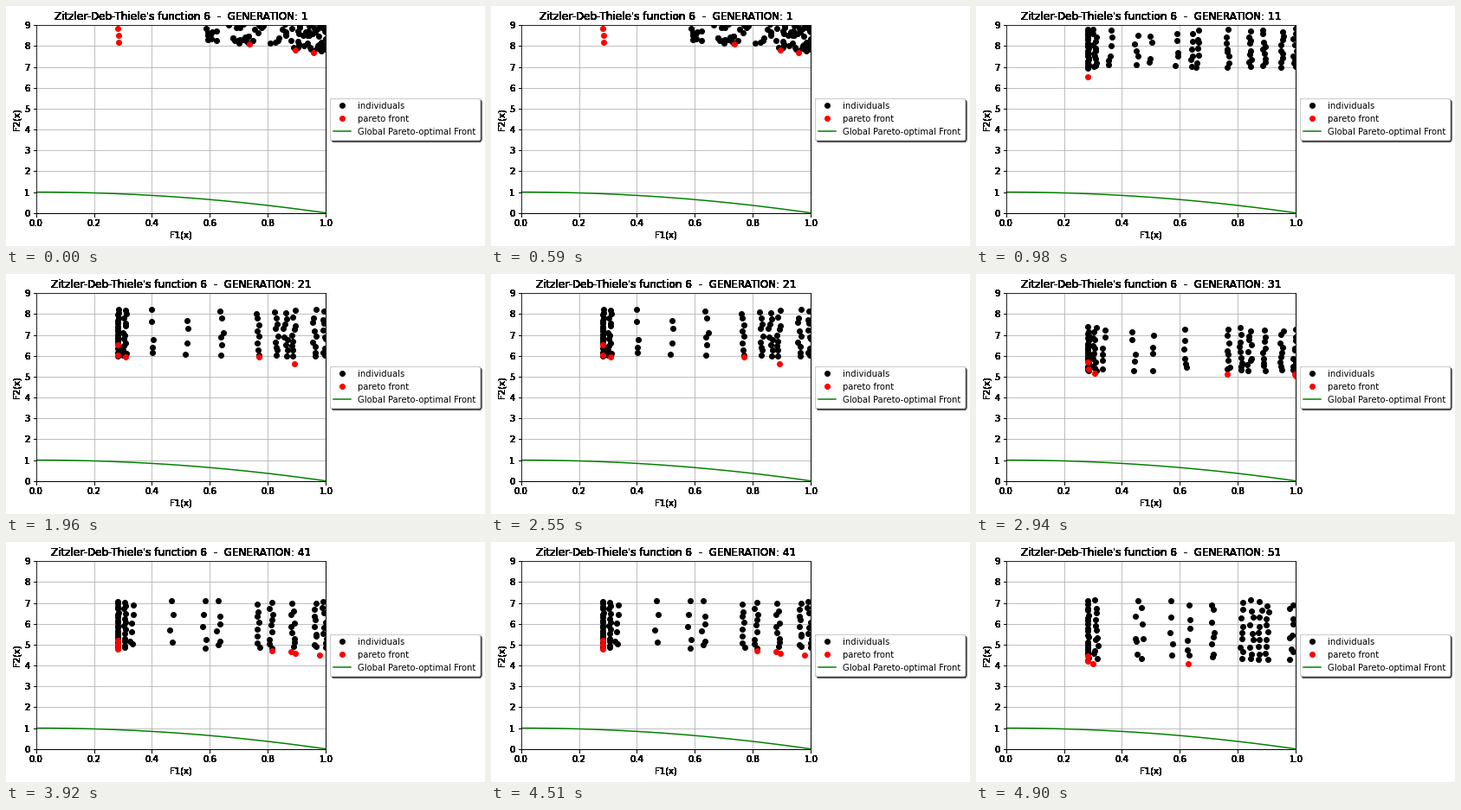
A matplotlib script for the animation above (5880 ms loop, 553 by 278 pixels).

```python
import numpy as np
import matplotlib.pyplot as plt
from matplotlib.animation import FuncAnimation

W, H, DPI = 553, 278, 72
LEFT, BOTTOM = 34.56, 38.3         # lower left corner of the plot area, px
AX_W, AX_H = 334.8, 217.44
Y_MAX = 9
LAYERS = 24                        # stacked axes make the outer text heavy
STEP_MS = 980

plt.rcParams.update({"font.family": "DejaVu Sans", "font.size": 10})


def starters(rng, n=95):
    """First random individuals, packed towards the upper right corner."""
    x = 1 - 0.42 * rng.random(n) ** 2.4
    floor = 8.1 - 0.35 * (x - 0.6) / 0.4
    return x, floor + (9.1 - floor) * rng.random(n)


def columns(rng, centres, low, high):
    """Upright groups of individuals, fullest at the first centre."""
    xs, ys = [], []
    for k, centre in enumerate(centres):
        n = round(np.interp(centre, [0.283, 0.33, 0.5, 0.8], [20, 6, 4, 9]))
        t = (np.arange(n) + rng.uniform(0.1, 0.9, n)) / n
        spread = 0.007 if k else 0.001
        xs.append(centre + rng.uniform(-spread, spread, n))
        ys.append(low + (high - low) * t ** 1.2)
    return np.concatenate(xs), np.concatenate(ys)


rng = np.random.default_rng(6)

# individuals and pareto front of every tenth generation
STAGES = [
    (starters(rng),
     [(0.283, 8.85), (0.285, 8.53), (0.285, 8.17),
      (0.735, 8.1), (0.893, 7.83), (0.958, 7.67)]),
    (columns(rng, [0.283, 0.305, 0.36, 0.45, 0.5, 0.59, 0.64, 0.66, 0.765,
                   0.84, 0.89, 0.955, 0.995], 6.95, 8.9),
     [(0.283, 6.53)]),
    (columns(rng, [0.283, 0.305, 0.4, 0.52, 0.64, 0.765, 0.83, 0.86, 0.89,
                   0.96, 0.995], 5.95, 8.3),
     [(0.283, 6.53), (0.283, 6.05), (0.309, 5.93),
      (0.769, 5.93), (0.89, 5.6)]),
    (columns(rng, [0.283, 0.305, 0.335, 0.44, 0.51, 0.62, 0.765, 0.81,
                   0.84, 0.89, 0.95, 0.995], 5.25, 7.4),
     [(0.283, 5.72), (0.285, 5.38), (0.306, 5.18),
      (0.764, 5.13), (0.997, 5.1), (0.999, 5.02)]),
    (columns(rng, [0.283, 0.308, 0.33, 0.468, 0.58, 0.63, 0.765, 0.81,
                   0.885, 0.96, 0.995], 4.8, 7.2),
     [(0.283, 5.22), (0.283, 4.98), (0.283, 4.77), (0.815, 4.69),
      (0.88, 4.68), (0.893, 4.57), (0.978, 4.48)]),
    (columns(rng, [0.283, 0.31, 0.45, 0.468, 0.57, 0.63, 0.715, 0.812,
                   0.845, 0.875, 0.9, 0.985], 4.25, 7.2),
     [(0.283, 4.45), (0.283, 4.2), (0.3, 4.1), (0.63, 4.1)]),
]


def make_layer(k):
    ax = fig.add_axes([LEFT / W, BOTTOM / H, AX_W / W, AX_H / H],
                      label=f"layer {k}")
    people, = ax.plot([], [], "ko", label="individuals")
    front, = ax.plot([], [], "ro", label="pareto front")
    x = np.linspace(0, 1, 100)
    ax.plot(x, 1 - x ** 2, color="green", label="Global Pareto-optimal Front")
    ax.set(xlim=(0, 1), ylim=(0, Y_MAX), xlabel="F1(x)", ylabel="F2(x)",
           yticks=range(Y_MAX + 1))
    ax.grid(True)
    ax.legend(loc="center left", bbox_to_anchor=(1, 0.5),
              fancybox=True, shadow=True)
    return ax, people, front


fig = plt.figure(figsize=(W / DPI, H / DPI), dpi=DPI, facecolor="white")
layers = [make_layer(k) for k in range(LAYERS)]


def update(i):
    people, front = STAGES[i]
    for ax, *_ in layers:
        ax.set_title("Zitzler-Deb-Thiele's function 6  -  "
                     f"GENERATION: {10 * i + 1}", fontsize=12, pad=6)
    # only the top layer is visible inside the plot area
    _, dots, best = layers[-1]
    dots.set_data(*people)
    best.set_data(*zip(*front))
    return dots, best


anim = FuncAnimation(fig, update, frames=len(STAGES), interval=STEP_MS,
                     repeat=True, repeat_delay=0, blit=False)
plt.show()
```
